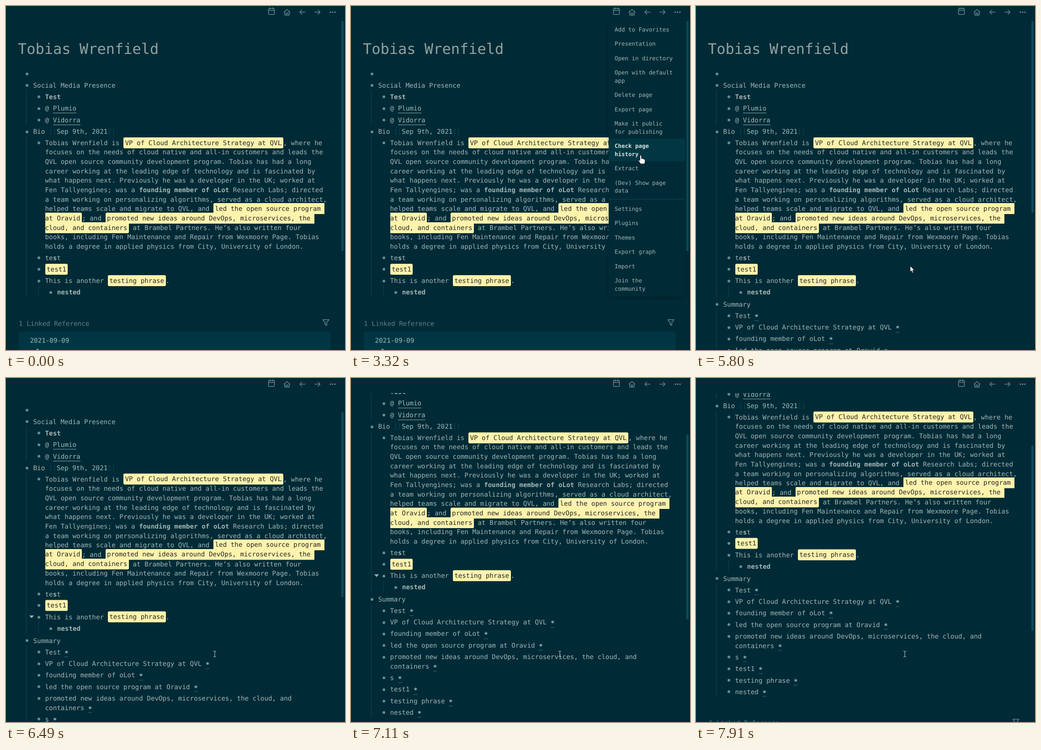
Animation of 742 by 754 pixels, one loop 8 s. Source, as an HTML page:

```html
<!DOCTYPE html>
<html lang="en">
<head>
<meta charset="utf-8">
<title>Page notes</title>
<style>
html, body { margin: 0; width: 100%; height: 100%; overflow: hidden; background: #002b36; }
body { position: relative; color: #a4b5b6; font: 14.24px/20.64px "DejaVu Sans Mono", "Noto Sans Mono", monospace;
  text-rendering: geometricPrecision; font-variant-ligatures: none; }
div, svg { position: absolute; white-space: pre; }
svg { left: 0; top: 0; overflow: visible; }
#page { left: 0; top: 0; width: 742px; }
h1 { position: absolute; margin: 0; left: 26px; top: 72px; font-size: 32px; line-height: 44px; font-weight: 400; color: #93a1a1; }
mark { background: #fef3ac; color: #262626; padding: 4.8px 3.5px 3px; border-radius: 3px; }
a { color: #9dbcbc; }
.link { border-bottom: 1px solid #8fb0b2; padding-bottom: 1px; }
.ref { border-bottom: 1px solid #3b6a72; padding-bottom: 1.5px; }
.ref span { position: relative; top: 2px; font-weight: 700; }
i { font-style: normal; color: #10434f; }
.dot { width: 6px; height: 6px; border-radius: 50%; background: #608e91; }
.tri { border: 5px solid transparent; border-top: 6px solid #9db3b5; border-bottom: 0; }
.guide { width: 1px; background: #0d4451; }
#linked { left: 0; top: 0; }
#box { left: 28px; top: 714px; width: 682px; height: 130px; border-radius: 4px; background: #003643; }
#head { left: 0; top: 0; width: 742px; height: 33px; background: #002b36; }
#strip { left: 739px; top: 0; width: 3px; height: 754px; background: #01262f; }
#bar { left: 734px; width: 5px; background: #0e495a; }
#menu { left: 564px; top: 34px; width: 168px; padding: 1.3px 0 2px; background: #002b36; font-size: 12.45px; line-height: 17.5px;
  border-radius: 0 0 4px 4px; box-shadow: 0 4px 10px rgba(0, 0, 0, .22); transform-origin: 100% 0; }
#menu p { margin: 0; padding: 7.5px 13px 6.5px; }
#menu p.on { background: #013742; color: #d8e3e3; font-weight: 700; }
#menu hr { margin: 3px 0 4px; border: 0; height: 1px; background: #144854; }
.icon { fill: none; stroke: #5f868c; stroke-width: 1.5; stroke-linecap: round; stroke-linejoin: round; }
</style>
</head>
<body>
<div id="page">
  <h1>Tobias Wrenfield</h1>
  <div id="linked">
    <div id="box"></div>
    <svg class="icon" width="1" height="1"><path d="M693.5 687.5h13.5l-5 6.5v6l-3.5-2v-4z"/></svg>
  </div>
</div>
<div id="head"></div>
<div id="strip"></div>
<div id="bar"></div>
<svg width="742" height="754">
  <rect id="hover" x="702" width="28" height="26" rx="3" fill="#023844"/>
  <g class="icon">
    <rect x="574.5" y="5.5" width="13" height="13" rx="1.5"/>
    <path d="M574.5 9.8h13M578 3.5v3.5M584 3.5v3.5"/>
    <path d="M608.5 13.5l6.5-6 6.5 6M610.2 12.5v7.5h9.6v-7.5M613.3 20v-4.5h3.4v4.5"/>
    <path d="M654.5 13.5h-11.5m4.5-4.5l-4.5 4.5 4.5 4.5"/>
    <path d="M676 13.5h11.5m-4.5-4.5l4.5 4.5-4.5 4.5"/>
  </g>
  <g id="dots"><circle cx="710" cy="13.5" r="1.6"/><circle cx="715" cy="13.5" r="1.6"/><circle cx="720" cy="13.5" r="1.6"/></g>
</svg>
<div id="menu"></div>
<svg width="742" height="754">
  <g id="cursor">
    <circle id="press" cx="2" r="10.5" fill="#bdc016" opacity=".75"/>
    <path id="hand" fill="#fff" stroke="#111" stroke-width=".8"
      d="M-1.6 11V.8a1.6 1.6 0 0 1 3.2 0V6.5q2.6-1 3 .6q2.3-.6 2.7.9q2.2-.2 2.2 2v3.5q0 2-1.6 4.5H0q-1-2.4-4.6-6.2q-.8-1.8 1-1.8z"/>
    <path id="arrow" fill="#fff" stroke="#111" stroke-width=".7" d="M0 0V12.5L2.8 9.9 4.9 15 6.9 14.2 4.8 9.2H8.8z"/>
    <path id="beam" fill="none" stroke="#c3cccc" d="M-3-6.5q3 0 3 2 0-2 3-2M0-4.5V4.5M-3 6.5q3 0 3-2 0 2 3 2"/>
  </g>
</svg>
<script>
const $ = id => document.getElementById(id);
const page = $('page'), linked = $('linked'), menu = $('menu');
const clamp = v => Math.max(0, Math.min(1, v));
const ease = v => (v = clamp(v), v * v * (3 - 2 * v));
const show = (el, on) => { el.style.visibility = on ? 'visible' : 'hidden'; };

function add(parent, cls, x, y, html = '') {
  const el = document.createElement('div');
  el.className = cls;
  el.style.left = x + 'px';
  el.style.top = y + 'px';
  el.innerHTML = html;
  return parent.appendChild(el);
}

// One outline block: y is the middle of its first line.
const dotX = [45.6, 72, 98], textX = [59.5, 85.5, 111.7], parents = [];
function block(level, y, html, isParent) {
  const dot = add(page, 'dot', dotX[level] - 3, y - 3);
  const text = add(page, '', textX[level], y - 9.5, html);
  if (isParent) parents.push({ y, tri: add(page, 'tri', dotX[level] - 21, y - 3.5) });
  return [dot, text];
}
function guide(x, top, bottom) {
  const el = add(page, 'guide', x, top);
  el.style.height = bottom - top + 'px';
  return el;
}

block(0, 148.5, '');
block(0, 174, 'Social Media Presence', true);
block(1, 199, '<b>Test</b>');
block(1, 224.5, '@ <a class="link">Plumio</a>');
block(1, 250, '@ <a class="link">Vidorra</a>');
block(0, 275.5, 'Bio <i>[[</i><a>Sep 9th, 2021</a><i>]]</i>', true);
block(1, 300.3, `Tobias Wrenfield is <mark>VP of Cloud Architecture Strategy at QVL</mark>, where he
focuses on the needs of cloud native and all-in customers and leads the
QVL open source community development program. Tobias has had a long
career working at the leading edge of technology and is fascinated by
what happens next. Previously he was a developer in the UK; worked at
Fen Tallyengines; was a <b>founding member of oLot</b> Research Labs; directed
a team working on personalizing algorithms, served as a cloud architect,
helped teams scale and migrate to QVL, and <mark>led the open source program 
at Oravid</mark>; and <mark>promoted new ideas around DevOps, microservices, the 
cloud, and containers</mark> at Brambel Partners. He’s also written four
books, including Fen Maintenance and Repair from Wexmoore Page. Tobias
holds a degree in applied physics from City, University of London.`);
block(1, 552, 'te<b>s</b>t');
block(1, 577, '<mark>test1</mark>');
block(1, 602.5, 'This is another <mark>testing phrase</mark>.', true);
block(2, 627.5, '<b>nested</b>');
guide(44, 184, 260);
guide(44, 286, 638);
guide(70.5, 613, 638);

const summaryY = 654;
const itemY = i => summaryY + 25.3 * i + (i > 5 ? 20.6 : 0);
const summary = ['Test', 'VP of Cloud Architecture Strategy at QVL', 'founding member of oLot',
  'led the open source program at Oravid',
  'promoted new ideas around DevOps, microservices, the cloud, and\ncontainers',
  's', 'test1', 'testing phrase', 'nested']
  .map((s, i) => block(1, itemY(i + 1), s + ' <a class="ref"><span>*</span></a>'));
summary.unshift(block(0, summaryY, 'Summary'));
const summaryGuide = guide(44, 664, 912);

add(linked, '', 28, 686.5, '1 Linked Reference').style.color = '#5f8087';
add(linked, '', 52.5, 724, '<a>2021-09-09</a>');
add(linked, 'dot', 66, 751);

menu.innerHTML = ['Add to Favorites', 'Presentation', 'Open in directory', 'Open with default\napp',
  'Delete page', 'Export page', 'Make it public\nfor publishing', 'Check page\nhistory', 'Extract',
  '(Dev) Show page\ndata', '', 'Settings', 'Plugins', 'Themes', 'Export graph', 'Import', 'Join the\ncommunity']
  .map(s => s ? `<p>${s}</p>` : '<hr>').join('');
const options = [...menu.querySelectorAll('p')];

// Pointer moves: start, end, x, y
const moves = [[440, 580, 709, 185], [840, 1190, 715, 29], [1340, 1690, 718, 16], [2620, 3320, 634, 328],
  [3650, 4110, 626, 357], [4660, 4870, 610, 428], [5070, 5800, 469, 570], [5940, 6080, 457, 605]];
function pointer(t) {
  let x = 709, y = 480;
  for (const [start, end, toX, toY] of moves) {
    const k = ease((t - start) / (end - start));
    x += (toX - x) * k;
    y += (toY - y) * k;
  }
  return [x, y];
}

function scrollAt(t) {
  if (t < 6350) return 0;
  if (t >= 7840) return t < 7910 ? 193 : 214.5;
  return 176 * (1 - Math.exp((6350 - t) / 239));
}

function draw(t) {
  const [x, y] = pointer(t), scroll = scrollAt(t);

  // Summary rows arrive one by one and push the references down.
  const count = t < 4660 ? -1 : t < 4800 ? 0 : Math.min(9, Math.max(1, Math.floor((t - 4790) / 140)));
  summary.forEach((row, i) => row.forEach(el => show(el, i <= count)));
  const grown = count < 0 ? 0 : itemY(count) - 627.5;
  show(summaryGuide, count > 0);
  summaryGuide.style.height = Math.max(0, itemY(count) - 654) + 'px';
  linked.style.top = grown + 'px';
  page.style.transform = `translateY(${-scroll}px)`;

  const ratio = 754 / (1128 + grown);
  $('bar').style.top = 33 + scroll * ratio + 'px';
  $('bar').style.height = 754 * ratio + 'px';

  const hovering = t >= 440 && t < 900 || t > 5900 && t < 7840;
  for (const p of parents) show(p.tri, hovering && Math.abs(y - p.y) < 12.7);

  const open = clamp(Math.min((t - 2080) / 120, (4460 - t) / 120));
  menu.style.opacity = open;
  menu.style.transform = `scale(${.95 + .05 * open})`;
  for (const o of options) {
    const top = 34 + o.offsetTop;
    o.className = y >= top && y < top + o.offsetHeight ? 'on' : '';
  }

  show($('hover'), t >= 2020 && t < 2620);
  $('dots').setAttribute('fill', t > 1450 && t < 2680 ? '#d5dfdf' : '#6d9095');

  const kind = t > 1400 && t < 4400 ? 'hand' : y < 160 || y > 545 && y < 598 ? 'arrow' : 'beam';
  for (const id of ['hand', 'arrow', 'beam']) show($(id), id === kind && t >= 440);
  show($('press'), t >= 2020 && t < 2150 || t >= 4330 && t < 4400);
  $('cursor').setAttribute('transform', `translate(${x} ${y})`);
}

function loop() {
  draw(performance.now() % 8000);
  requestAnimationFrame(loop);
}
loop();
</script>
</body>
</html>
```
